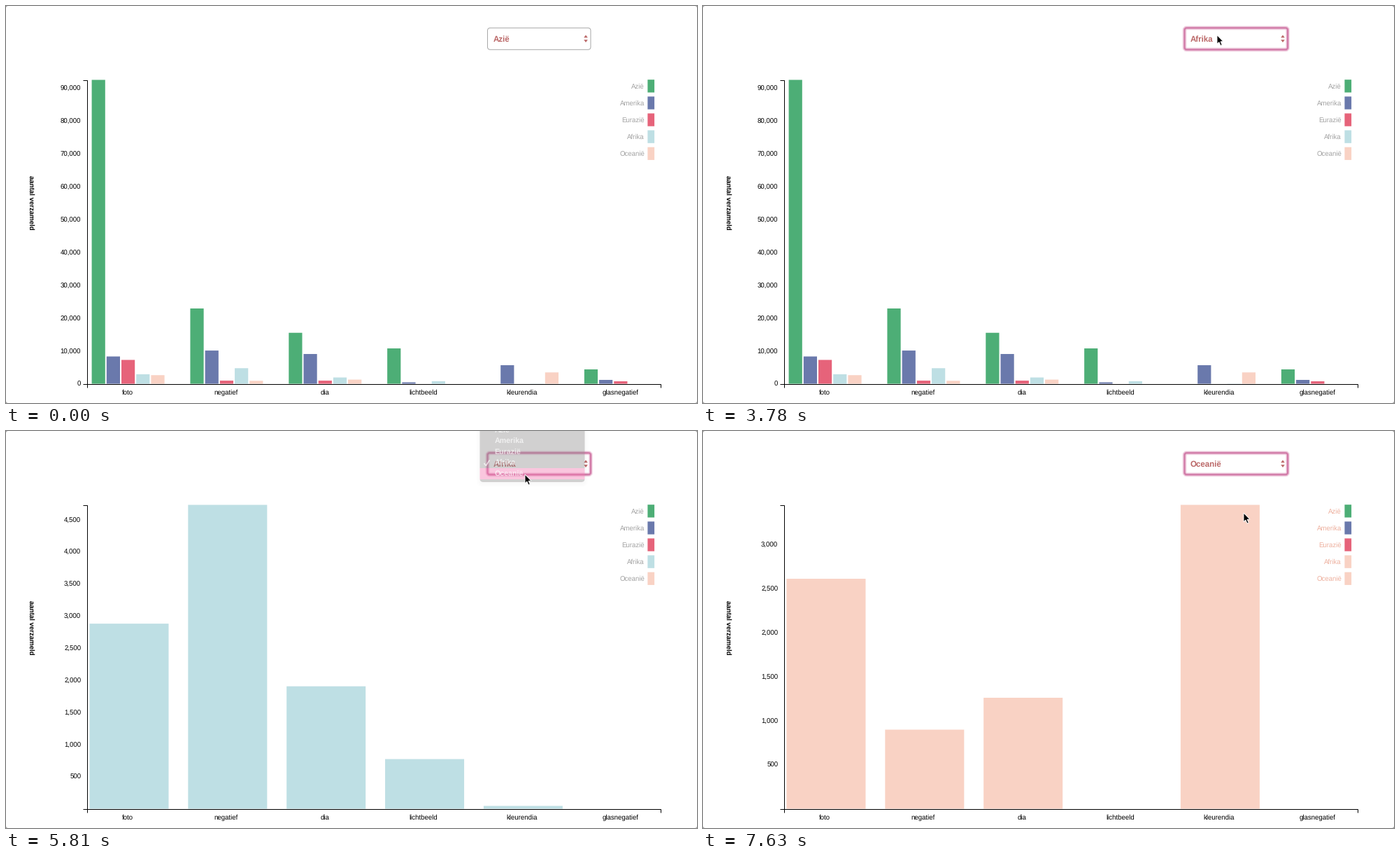
A matplotlib script that plays this animation: 988x567 px, repeating every 7.7 s.

```python
import math

import numpy as np
import matplotlib.pyplot as plt
from matplotlib.animation import FuncAnimation
from matplotlib.patches import FancyBboxPatch, Polygon, Rectangle

W, H, DPI = 988, 567, 64
FRAMES, STEP = 110, 70
PT = 72 / DPI  # points per pixel

plt.rcParams["font.family"] = "Liberation Sans"
plt.rcParams["text.hinting"] = "none"
fig = plt.figure(figsize=(W / DPI, H / DPI), dpi=DPI, facecolor="#a0a0a0")
ax = fig.add_axes([0, 0, 1, 1])
ax.set_xlim(0, W)
ax.set_ylim(H, 0)
ax.axis("off")


def rgb(r, g, b):
    return np.array([r, g, b]) / 255


KINDS = ["foto", "negatief", "dia", "lichtbeeld", "kleurendia", "glasnegatief"]
COUNTS = {
    "Azië": [92440, 22900, 15500, 10750, 0, 4370],
    "Amerika": [8300, 10100, 9050, 430, 5640, 1170],
    "Eurazië": [7250, 950, 950, 0, 0, 750],
    "Afrika": [2881, 4730, 1906, 773, 44, 0],
    "Oceanië": [2611, 898, 1260, 0, 3450, 0],
}
REGIONS = list(COUNTS)
COLORS = dict(zip(REGIONS, [rgb(77, 174, 118), rgb(106, 121, 172), rgb(230, 99, 122),
                            rgb(190, 223, 228), rgb(249, 210, 196)]))
ROSE, GREY, PINK = rgb(187, 104, 104), rgb(163, 163, 163), rgb(238, 176, 158)
MENU_GREY, MENU_PINK = rgb(148, 146, 147), rgb(250, 122, 180)

TOP, BASE, BAND = 105.5, 539.5, 140.85


def label(x, y, s, size=9.65, z=3, **kw):
    return ax.text(x, y, s, fontsize=size * PT, va="baseline", zorder=z, **kw)


def box(x, y, w, h, r, z, **kw):
    style = f"round,pad=0,rounding_size={r}"
    return ax.add_patch(FancyBboxPatch((x, y), w, h, boxstyle=style, zorder=z, **kw))


def line(xs, ys, color="black", width=1, z=4):
    return ax.plot(xs, ys, color=color, lw=width * PT, zorder=z,
                   solid_joinstyle="miter", solid_capstyle="butt")[0]


def rect(x, y, w, h, color, z=2):
    return ax.add_patch(Rectangle((x, y), w, h, fc=color, ec="none", zorder=z, snap=False))


def ease(t):
    t = min(max(t, 0), 1)
    return 4 * t ** 3 if t < 0.5 else 1 - (2 - 2 * t) ** 3 / 2


def mix(a, b, p):
    return a + (b - a) * p


# ---- charts: (bars, maximum, tick values); bars are (x, width, height, colour) ----
def height(value, top):
    return (BASE - TOP) * value / top


def grouped_chart():
    top = max(map(max, COUNTS.values()))
    bars = [(122.6 + BAND * i + 21.2 * j, 19.2, height(COUNTS[name][i], top), COLORS[name])
            for i in range(len(KINDS)) for j, name in enumerate(REGIONS)]
    return bars, top, range(0, top, 10000)


def single_chart(name):
    """One region; bars are bound from the largest count to the smallest."""
    counts = COUNTS[name]
    top = max(counts)
    order = sorted(range(len(KINDS)), key=lambda i: -counts[i])
    bars = [(119.5 + BAND * i, 113, height(counts[i], top), COLORS[name])
            for i in order if counts[i]]
    return bars, top, range(500, top, 500)


CHARTS = [grouped_chart(), single_chart("Afrika"), single_chart("Oceanië")]
STARTS = [3860, 6203]
BAR_MS, AXIS_MS = 300, 650
SETTLED = 6930

# ---- fixed parts ----
box(0, 0, W, H, 3, 0, fc="white", ec="none")
line([110, 116, 116, 110], [105.9, 105.9, 539.9, 539.9])
line([116, 116, 936, 936], [545, 539.9, 539.9, 545])
for i, kind in enumerate(KINDS):
    label(174 + BAND * i, 554.7, kind, ha="center")
ax.text(36, 281, "aantal verzameld", fontsize=9.65 * PT, weight="bold",
        rotation=270, ha="center", va="center")

legend_text, swatches = [], {}
for i, name in enumerate(REGIONS):
    y = 105.2 + 24.1 * i
    legend_text.append(label(913, y + 12.3, name, ha="right"))
    swatches[name] = rect(917.4, y, 9.7, 18.3, COLORS[name])

bars = [rect(0, 0, 0, 0, "white") for _ in CHARTS[0][0]]
ticks = [label(107.2, 0, "", ha="right") for _ in range(20)]

# ---- select field ----
FIELD = (688.5, 31.3, 147.5, 31)
box(*FIELD, 4, 5, fc="white", ec="#a8a8a8", lw=PT)
ring = [box(*FIELD, 3, 6, fc="none", ec="#d272a4", lw=w * PT, alpha=a)
        for w, a in [(6, 0.2), (4, 0.4), (2, 0.8)]]
choice = label(696.7, 50.5, "", 11.5, 7, weight="bold", color=ROSE)
for side in (-1, 1):
    tip, foot = 46.7 + side * 5.3, 46.7 + side * 1.5
    ax.add_patch(Polygon([(829, tip), (826.2, foot), (831.8, foot)], fc=ROSE, ec="none", zorder=7))

# ---- popup menu ----
ROW, FIRST_ROW = 15.5, 45.5
MENU_X, MENU_Y, MENU_W, MENU_H = 677.5, 33, 150, 86.5
shadows = [box(MENU_X - g, 0, MENU_W + 2 * g, MENU_H + 2 * g, 5 + g, 10, fc="black", ec="none")
           for g in range(1, 6)]
# Above, on and below the hovered row: one shape, clipped three ways.
slabs = [box(MENU_X, 0, MENU_W, MENU_H, 5, 11, fc=MENU_GREY, ec="none") for _ in range(3)]
items = [label(698.5, 0, s, 10.6, 12, weight="bold", color="white") for s in REGIONS]
check = line([], [], "white", 1.7, 12)
menu_parts = shadows + slabs + items + [check]

# opens, highlight blinks, fade starts, vertical shift, checked row
MENUS = [(2240, 3080, 3200, 0, 0), (4900, 5600, 5700, -46.5, 3)]
FADE_MS = 183

# ---- pointer: moves are (start, end, x, y) ----
ARROW = np.array([(0, 0), (0, 12.8), (2.9, 10.1), (5, 15), (7.2, 14.1), (5.1, 9.3), (9, 9.2)])
pointer = ax.add_patch(Polygon(ARROW, fc="black", ec="white", lw=0.9 * PT, zorder=20))
ENTRY = (776, 556)
MOVES = [(1400, 1680, 684, 144.5), (1680, 2100, 700, 46), (2380, 2800, 713, 89),
         (3430, 3780, 735, 41.5), (4970, 5320, 742, 62), (7000, 7560, 773, 117)]


def pointer_at(t):
    spot = np.array(ENTRY, float)
    for start, end, x, y in MOVES:
        p = min(max((t - start) / (end - start), 0), 1)
        spot = mix(spot, np.array([x, y]), math.sin(p * math.pi / 2))
    return spot


def draw_bars(old, new, p):
    shown = new if p > 0 else old
    for bar in bars[len(shown):]:
        bar.set_visible(False)
    for bar, before, after in zip(bars, old, shown):
        x, w, h, color = (mix(a, b, p) for a, b in zip(before, after))
        bar.set_visible(True)
        bar.set_bounds(x, BASE - h, w, h)
        bar.set_facecolor(color)


def draw_ticks(old, new, p):
    top = 1 / mix(1 / old[1], 1 / new[1], p)
    values = sorted({*old[2], *new[2]})
    for text in ticks:
        text.set_visible(False)
    shown = [v for v in values if height(v, top) < BASE]
    for text, v in zip(ticks, shown):
        text.set_visible(True)
        text.set_text(f"{v:,}")
        text.set_y(BASE - height(v, top) + 3.7)
        text.set_alpha((v in old[2]) * (1 - p) + (v in new[2]) * p)


def draw_menu(t, tip):
    for part in menu_parts:
        part.set_visible(False)
    for opens, blink, fade, shift, checked in MENUS:
        alpha = 1 - max(0, t - fade) / FADE_MS
        if t < opens or alpha <= 0:
            continue
        for part in menu_parts:
            part.set_visible(True)
            part.set_alpha(alpha ** 0.4)
        for grow, shadow in enumerate(shadows, 1):
            shadow.set_y(MENU_Y + shift - grow + 2)
            shadow.set_alpha(0.013 * alpha)

        first = FIRST_ROW + shift
        row_y = first + ROW * (math.floor((tip[1] - first) / ROW + 0.5) - 0.5)
        edges = [-H, row_y, row_y + ROW, H]
        for slab, y0, y1 in zip(slabs, edges, edges[1:]):
            slab.set_y(MENU_Y + shift)
            slab.set_alpha(alpha)
            slab.set_clip_path(Rectangle((0, y0), W, y1 - y0, transform=ax.transData))
        blinking = blink <= t < blink + STEP
        slabs[1].set_facecolor(MENU_GREY if blinking else MENU_PINK)

        for i, item in enumerate(items):
            item.set_y(first + ROW * i + 3.8)
        mid = first + ROW * checked
        check.set_data([683.5, 686.3, 691.5], [mid + 0.5, mid + 4, mid - 4])


def draw(n):
    t = n * STEP
    stage = int(t >= STARTS[1])
    old, new = CHARTS[stage:stage + 2]
    since = t - STARTS[stage]
    draw_bars(old[0], new[0], ease(since / BAR_MS))
    draw_ticks(old, new, ease(since / AXIS_MS))

    tip = pointer_at(t)
    pointer.set_visible(t >= MOVES[0][0])
    pointer.set_xy(ARROW + tip)
    draw_menu(t, tip)

    choice.set_text("Oceanië" if t >= 6090 else "Afrika" if t >= 3720 else "Azië")
    for part in ring:
        part.set_visible(t >= MENUS[0][0])

    # The legend takes on the peach tone once the last chart has settled.
    for text in legend_text:
        text.set_color(PINK if t >= SETTLED else GREY)
    swatches["Afrika"].set_facecolor(COLORS["Oceanië" if t >= SETTLED else "Afrika"])
    return []


anim = FuncAnimation(fig, draw, frames=FRAMES, interval=STEP, repeat=True,
                     repeat_delay=0, blit=False)
plt.show()
```
